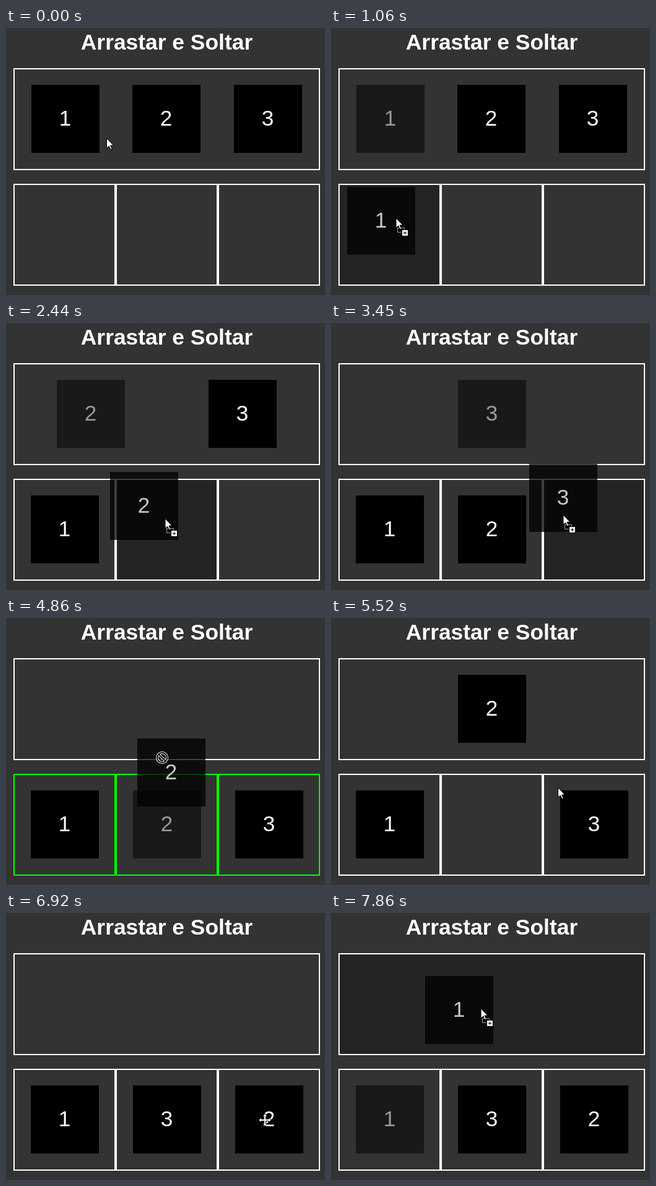
An HTML page for the animation above (7.99 s loop, 515x432 px).

```html
<!DOCTYPE html>
<html lang="pt">
<head>
<meta charset="utf-8">
<title>Arrastar e Soltar</title>
<style>
  html, body { margin: 0; width: 100%; height: 100%; overflow: hidden; background: #333; }
  #stage { position: relative; width: 515px; height: 432px; overflow: hidden; color: #fff;
    font-family: Arial, "Liberation Sans", sans-serif; }
  #stage > * { position: absolute; left: 0; top: 0; margin: 0; box-sizing: border-box; }
  #stage > h1 { width: 519px; font-size: 35.4px; line-height: 47px; text-align: center; }
  .zone { border: 2px solid #fff; height: 165px; }
  .box { width: 110px; height: 110px; background: #000; font-size: 35px; line-height: 108px;
    text-align: center; text-indent: -1px; }
  #ghost { opacity: .75; }
  #cursor { width: 1px; height: 1px; overflow: visible; }
</style>
</head>
<body>
<div id="stage">
  <h1>Arrastar e Soltar</h1>
  <svg id="cursor">
    <defs>
      <path id="pointer" d="M.5 .5V16.5L4.2 13L7 18.5H8.8V17L6.6 12H11.5Z" fill="#fff" stroke="#000"/>
      <path id="ban" d="M-5 -5L5 5M8 0A8 8 0 1 1 -8 0A8 8 0 1 1 8 0" fill="none"/>
    </defs>
    <g id="arrow"><use href="#pointer"/></g>
    <g id="copy">
      <use href="#pointer" x="-.5"/>
      <rect x="2.5" y="16.5" width="11" height="7" fill="none" stroke="#ddd" stroke-dasharray="2 1"/>
      <rect x="9.5" y="19.5" width="10" height="10" fill="#fff" stroke="#000"/>
      <path d="M12 24.5H17M14.5 22V27" stroke="#000"/>
    </g>
    <g id="deny">
      <use href="#ban" stroke="#fff" stroke-width="4"/>
      <use href="#ban" stroke="#000" stroke-width="2"/>
    </g>
    <g id="move"><path fill="#fff" stroke="#000"
      d="M0 -10L4 -6H1.5V-1.5H6V-4L10 0L6 4V1.5H1.5V6H4L0 10L-4 6H-1.5V1.5H-6V4L-10 0L-6 -4V-1.5H-1.5V-6H-4Z"/></g>
  </svg>
</div>
<script>
const LOOP = 7990, SIZE = 110, CELL = 165, LEFT = 12, LINE = 2;
const TRAY_TOP = 65, ROW_TOP = 252;
const SETTLE = 35;              // a dropped box stays dim this long
const LEAVE = 40, LEAD = 80;    // pause after a drop and before a grab
const GLIDE = 480;              // longest trip between boxes

// Each drag takes a box from one point to another; zone 0 is the tray, 1 to 3 are the cells
const drag = (box, zone, from, to, [grab, rest, drop]) => ({ box, zone, from, to, grab, rest, drop });
const drags = [
  drag(1, 1, [120, 142], [105, 307], [520, 1060, 1238]),
  drag(2, 2, [171, 167], [257, 316], [1900, 2440, 2558]),
  drag(3, 3, [260, 174], [387, 325], [3030, 3552, 3658]),
  drag(2, 0, [245, 310], [258, 158], [4690, 5010, 5130]),
  drag(3, 2, [422, 334], [257, 336], [5790, 6040, 6065]),
  drag(2, 3, [262, 163], [418, 335], [6430, 6830, 6880]),
  drag(1, 0, [130, 331], [242, 154], [7430, 7860, LOOP])
];
const opening = { to: [162, 178], drop: -10 };

const stage = document.getElementById('stage');
const cursor = document.getElementById('cursor');
const shapes = ['arrow', 'copy', 'deny', 'move'].map(id => document.getElementById(id));

function add(cls, text = '') {
  const el = document.createElement('div');
  el.className = cls;
  el.textContent = text;
  return stage.insertBefore(el, cursor);
}
const place = (el, [x, y]) => { el.style.transform = `translate(${x}px,${y}px)`; };

const zones = [0, 1, 2, 3].map(i => i
  ? { x: LEFT + CELL * (i - 1), y: ROW_TOP, w: CELL }
  : { x: LEFT, y: TRAY_TOP, w: CELL * 3 });
const zoneEls = zones.map(z => {
  const el = add('zone');
  el.style.width = z.w + 'px';
  place(el, [z.x, z.y]);
  return el;
});
const boxEls = [1, 2, 3].map(n => add('box', n));
const ghost = add('box');
ghost.id = 'ghost';

function ease(a, b, start, end, t) {
  const u = Math.min(1, Math.max(0, (t - start) / (end - start)));
  const s = u * u * (3 - 2 * u);
  return a.map((v, k) => Math.round(v + (b[k] - v) * s));
}

function pointer(t) {
  const i = drags.findIndex(d => t < d.drop);
  const d = drags[i], last = drags[i - 1] || opening;
  if (t >= d.grab) return ease(d.from, d.to, d.grab, d.rest, t);
  const end = d.grab - LEAD;
  return ease(last.to, d.from, Math.max(last.drop + LEAVE, end - GLIDE), end, t);
}

function zonesAt(t) {
  const at = [0, 0, 0];
  for (const d of drags) if (t >= d.drop) at[d.box - 1] = d.zone;
  return at;
}

// Boxes share the inner width with equal space around each, in 1/64 px units
function spot({ x, y, w }, k, count) {
  const gap = Math.floor((w - 2 * LINE - SIZE * count) / (2 * count) * 64) / 64;
  return [Math.round(x + LINE + gap + k * (SIZE + 2 * gap)), y + 27];
}

function homes(at) {
  return at.map((z, i) => {
    const mates = [0, 1, 2].filter(j => at[j] === z);
    return spot(zones[z], mates.indexOf(i), mates.length);
  });
}

const inside = (x, y, bx, by, w, h) => x >= bx && x < bx + w && y >= by && y < by + h;

function render(t) {
  const [x, y] = pointer(t);
  const pos = homes(zonesAt(t));
  const now = drags.find(d => t >= d.grab && t < d.drop + SETTLE);
  const held = now && t < now.drop;
  const over = held ? zones.findIndex(z => inside(x, y, z.x, z.y + LINE, z.w, CELL - 3 * LINE)) : -1;
  const solved = zonesAt(t - SETTLE).every((z, i) => z === i + 1);

  zoneEls.forEach((el, i) => {
    el.style.background = i === over ? 'rgba(0,0,0,.3)' : 'none';
    el.style.borderColor = i && solved ? '#0f0' : '#fff';
  });
  boxEls.forEach((el, i) => {
    place(el, pos[i]);
    el.style.opacity = now && now.box === i + 1 ? .5 : 1;
  });

  ghost.style.display = held ? 'block' : 'none';
  if (held) {
    const [hx, hy] = pos[now.box - 1];
    ghost.textContent = now.box;
    place(ghost, [hx + x - now.from[0], hy + y - now.from[1]]);
  }

  const onBox = pos.some(([bx, by]) => inside(x, y, bx, by, SIZE, SIZE));
  const mode = held ? (over < 0 ? 'deny' : 'copy') : onBox && !now ? 'move' : 'arrow';
  shapes.forEach(g => { g.style.display = g.id === mode ? 'inline' : 'none'; });
  place(cursor, [x, y]);
}

const began = performance.now();
function tick() {
  render((performance.now() - began) % LOOP);
  requestAnimationFrame(tick);
}
tick();
</script>
</body>
</html>
```
